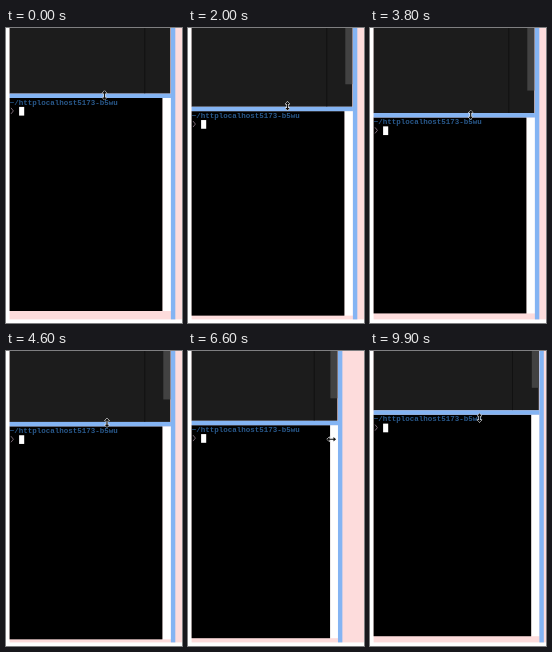
Recreate the animation shown at these times as an HTML page. Size 176x295 px, loop 10 s.

```html
<!DOCTYPE html>
<html lang="en">
<head>
<meta charset="utf-8">
<title>Resizable panes</title>
<style>
  html, body { margin: 0; width: 100%; height: 100%; overflow: hidden; background: #fff; }
  svg { display: block; width: 176px; height: 295px; }
  text { font: bold 7.5px "Liberation Mono", "DejaVu Sans Mono", monospace; white-space: pre; }
</style>
</head>
<body>
<svg viewBox="0 0 176 295">
  <rect x="3.6" width="173" height="291.4" fill="#fddcdc"/>
  <rect id="editor" x="3.6" fill="#1c1c1c"/>
  <rect id="minimapEdge" width="1" fill="#111"/>
  <rect id="thumb" width="7" fill="#424242"/>
  <rect id="gutter" fill="#fff"/>
  <rect id="terminal" x="3.6" fill="#000"/>
  <g id="prompt">
    <text x="3.8" y="6.6" fill="#29598c">~/httplocalhost5173-b5wu</text>
    <path d="M5 9.9L7.4 12.9L5 15.9" fill="none" stroke="#85727f" stroke-width=".9"/>
    <rect x="13.1" y="8.9" width="5.1" height="8.7" fill="#fff"/>
  </g>
  <rect id="rowBar" x="3.6" height="4.4" fill="#84b4f3"/>
  <rect id="columnBar" width="4.4" height="291.4" fill="#84b4f3"/>
  <path id="pointer" d="M0-4.6L2.3-2H.6V2H2.3L0 4.6L-2.3 2H-.6V-2H-2.3Z"
    fill="#111" stroke="#fff" stroke-linejoin="round" paint-order="stroke"/>
</svg>
<script>
const LOOP = 10000, STEP = 100, LAG = 100;
const LEFT = 3.6, BAR = 4.4, CELL_W = 4.775, CELL_H = 8.52, MIN_COLUMN = 140.8;
const part = Object.fromEntries(
  [...document.querySelectorAll("[id]")].map(node => [node.id, node]));

// The pointer eases between these stops; the bars follow it while dragged.
const stops = [
  { at: 0, x: 98.5, y: 67.4 },
  { at: 1300, x: 99, y: 90 },
  { at: 2700, x: 100, y: 66 },
  { at: 3750, x: 100.7, y: 87 },
  { at: 4650, x: 101, y: 71.6 },
  { at: 5300, x: 167, y: 91 },
  { at: 5800, x: 139, y: 91 },
  { at: 6200, x: 166, y: 90 },
  { at: 7200, x: 102, y: 85 },
  { at: 7700, x: 79, y: 84 },
  { at: 8150, x: 171.6, y: 92 },
  { at: 8800, x: 25, y: 76 },
  { at: 9200, x: 107, y: 71.6 },
  { at: 9700, x: 109.5, y: 58 },
  { at: LOOP, x: 109.5, y: 70 }
];
const rowDrags = [[0, 4650], [9200, LOOP]];
const columnDrag = [5300, 8150];

const clamp = (value, [low, high]) => Math.min(high, Math.max(low, value));

function pointerAt(time) {
  const next = stops.findIndex(stop => stop.at > time);
  const from = stops[next - 1], to = stops[next];
  const p = (time - from.at) / (to.at - from.at);
  const mix = key => from[key] + (to[key] - from[key]) * p * p * (3 - 2 * p);
  return { x: mix("x"), y: mix("y") };
}

function set(node, attributes) {
  for (const [name, value] of Object.entries(attributes)) node.setAttribute(name, value);
}

function draw(time) {
  const rowDrag = rowDrags[time < rowDrags[1][0] ? 0 : 1];
  const row = pointerAt(clamp(time - LAG, rowDrag)).y - 1.8;
  const column = Math.max(MIN_COLUMN, pointerAt(clamp(time - LAG, columnDrag)).x - 2.2);
  const dragged = column + (time < columnDrag[0] + LAG ? 0.1 : 0);
  const top = row + BAR;

  // The terminal only grows by whole character cells.
  const width = Math.floor((dragged - 11) / CELL_W) * CELL_W;
  const height = Math.floor((288.5 - top) / CELL_H) * CELL_H;
  const right = LEFT + width;

  set(part.editor, { width: dragged - LEFT - .6, height: row });
  set(part.minimapEdge, { x: 142 + (dragged - 169.4) * .84, height: row });
  set(part.thumb, { x: dragged - 7.6, height: row - 22.5, opacity: Math.min(1, time / 300) });
  set(part.terminal, { y: top, width, height });
  set(part.gutter, { x: right, y: top, width: dragged - right, height });
  set(part.prompt, { transform: `translate(0 ${top})` });
  set(part.rowBar, { y: row, width: dragged - LEFT });
  set(part.columnBar, { x: dragged });

  const { x, y } = pointerAt(time);
  const sideways = time >= 5200 && time < 8700;
  set(part.pointer, { transform: `translate(${x} ${y}) rotate(${sideways ? 90 : 0})` });
}

const start = performance.now();
function tick() {
  const elapsed = (performance.now() - start) % LOOP;
  draw(Math.floor(elapsed / STEP) * STEP);
  requestAnimationFrame(tick);
}
tick();
</script>
</body>
</html>
```
